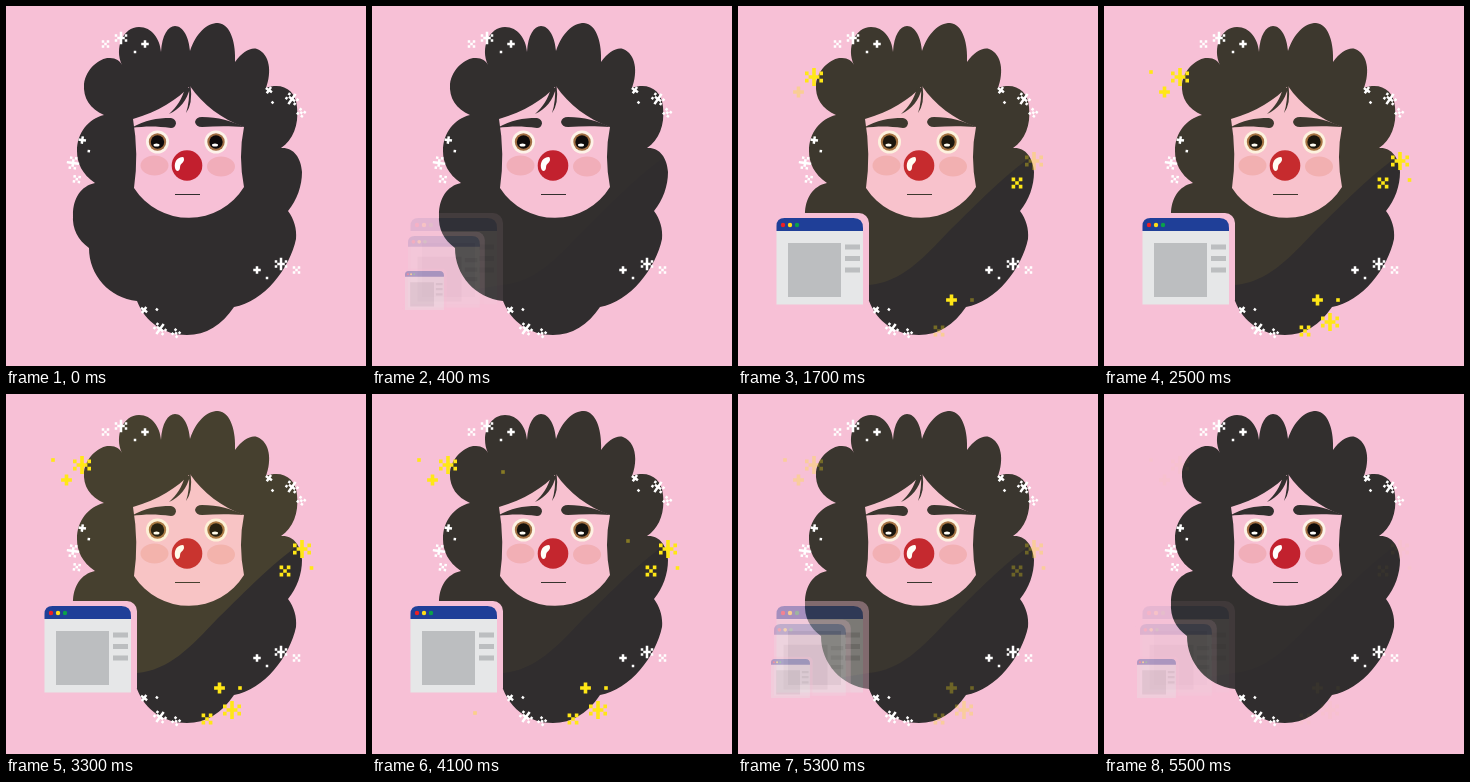
An HTML page that plays this animation: 360x360 px, repeating every 5.7 s.

```html
<!DOCTYPE html>
<html lang="en">
<head>
<meta charset="utf-8">
<title>Curly face and glowing window</title>
<style>
  html, body { margin: 0; width: 100%; height: 100%; overflow: hidden; background: #f7c0d6; }
  svg { display: block; width: 100vw; height: 100vh; }
</style>
</head>
<body>
<svg viewBox="0 0 360 360">
  <defs>
    <path id="hair" d="M98 109C84 103 77 92 78 78C80 62 95 51 104 52C110 52 114 55 116 59
      C108 42 117 21 133 21C146 21 154 33 155 46C156 29 162 20 169 20C177 20 183 31 184 45
      C190 27 201 17 212 17C225 18 230 38 229 56C236 46 245 41 251 43C264 48 266 66 260 82
      C276 76 290 84 291 101C293 119 287 134 275 142C287 141 295 151 296 166C296 180 291 194 282 205
      C288 213 291 223 290 233C284 262 258 296 228 301C216 319 200 329 181 329C158 329 139 316 131 295
      C103 292 83 269 83 242C72 234 66 223 67 209C67 192 75 180 89 177C76 168 71 157 71 145
      C71 127 82 113 98 109Z"/>
    <clipPath id="head"><use href="#hair"/></clipPath>
    <g id="eye">
      <circle r="11.500" fill="#fdf3ea"/>
      <circle r="8.700" fill="#a06d44"/>
      <circle r="6.700" fill="#0d0a0b"/>
      <ellipse cx="-1" cy="3" rx="3" ry="1.500" fill="#fff"/>
    </g>
    <g id="window">
      <rect x="-6" y="-5" width="98.500" height="97" rx="10" fill="#f7c0d6"/>
      <path d="M0 13H86.500V86.500H0Z" fill="#e6e7e8"/>
      <path d="M0 13V8Q0 0 8 0H77Q86.500 0 86.500 10V13Z" fill="#1f3f98"/>
      <circle cx="6.500" cy="7" r="2.200" fill="#ed2024"/>
      <circle cx="13.500" cy="7" r="2.200" fill="#ffde17"/>
      <circle cx="20.500" cy="7" r="2.200" fill="#0ba14a"/>
      <path d="M11.500 25h53v54h-53zM68.500 26.500h15v5h-15zm0 11.500h15v5h-15zm0 11.500h15v5h-15z" fill="#bcbec0"/>
    </g>
  </defs>

  <rect width="360" height="360" fill="#f7c0d6"/>
  <use href="#hair" fill="#302d2e"/>
  <path d="M184 80C172 93 152 106 127 113Q133 148 128 182A65 65 0 0 0 238 181
    Q232 150 238 121C216 113 197 99 184 80Z" fill="#f7c0d6"/>
  <g fill="#302d2e">
    <path d="M179 82C176 93 171 101 163 108C174 103 181 94 184 82ZM183 80Q184 95 180 107Q187 98 184.500 79Z"/>
    <path d="M125 122C140 114 150 112 165 112Q170 113 170 117.500Q169 122 165 122C150 120 140 120 125 122Z"/>
    <path d="M189 116Q190 111 196 111C212 111 226 115 238 121C225 120 210 120 196 121Q190 121 189 116Z"/>
    <path d="M169 188h25v1h-25z"/>
  </g>
  <g fill="#f1adba">
    <ellipse cx="148.500" cy="159.500" rx="14" ry="10"/>
    <ellipse cx="215" cy="160.500" rx="14" ry="10"/>
  </g>
  <use href="#eye" x="151.500" y="136"/>
  <use href="#eye" x="210" y="136"/>
  <circle cx="181" cy="159.500" r="15.300" fill="#c21f2e"/>
  <path d="M177 151C171 151 168 156 169 162C170 166.500 174 165.500 174 161.500C174 157 178 157 178 153.500Q178 151 177 151Z" fill="#fff"/>

  <path id="glow" clip-path="url(#head)" fill="#ffdc3c"
    d="M0 0H360V100L298 147C262 173 243 194 212 224C184 254 163 276 131 279L0 300Z"/>
  <g id="sparks">
    <g id="cluster"></g>
    <use href="#cluster" transform="translate(115 32)"/>
    <use href="#cluster" transform="translate(67 157) rotate(-82)"/>
    <use href="#cluster" transform="translate(154 323) rotate(216)"/>
    <use href="#cluster" transform="translate(275 258) scale(-1 1)"/>
    <use href="#cluster" transform="translate(286 93) rotate(35) scale(-1 1)"/>
  </g>
  <g id="windows"></g>
</svg>

<script>
const LOOP = 5700;
const $ = id => document.getElementById(id);

function add(parent, tag, attrs) {
  const el = document.createElementNS('http://www.w3.org/2000/svg', tag);
  for (const k in attrs) el.setAttribute(k, attrs[k]);
  return parent.appendChild(el);
}

const kinds = {
  star: ['..#..', '#.#.#', '.###.', '#.#.#', '..#..'],
  cross: ['#.#', '.#.', '#.#'],
  plus: ['.#.', '###', '.#.'],
  dot: ['#']
};

function spark(parent, kind, x, y, fill, cell) {
  const rows = kinds[kind], mid = rows.length / 2;
  let d = '';
  rows.forEach((row, j) => [...row].forEach((c, i) => {
    if (c === '#') d += `M${i - mid} ${j - mid}h1v1h-1z`;
  }));
  return add(parent, 'path', { d, fill, transform: `translate(${x} ${y}) scale(${cell})` });
}

// One white cluster, repeated around the hair by rotation and mirroring
const white = (kind, x, y) => spark($('cluster'), kind, x, y, '#fff', 2.5);
white('star', 0, 0);
white('cross', -15.5, 6);
white('plus', 24, 6);
white('dot', 14, 14);
// The defining copy is parked outside the stage
$('sparks').insertBefore(add($('sparks'), 'defs', {}), $('cluster')).append($('cluster'));

const yellow = (kind, x, y) => spark($('sparks'), kind, x, y, '#ffe716', 3.6);
const waves = [
  [yellow('star', 76, 71), yellow('cross', 279, 177), yellow('plus', 213.5, 294)],
  [yellow('plus', 60.5, 86), yellow('star', 296, 155), yellow('cross', 201, 325), yellow('dot', 234, 294)],
  [yellow('dot', 47, 66), yellow('dot', 305.5, 174), yellow('star', 226, 316)]
];
const blinks = [yellow('dot', 131, 78), yellow('dot', 256, 147), yellow('dot', 103, 319)];

// The two smaller windows flash by while the large one builds up
const win = (x, y, s, fade) => ({
  fade, el: add($('windows'), 'use', { href: '#window', transform: `translate(${x} ${y}) scale(${s})` })
});
const windows = [
  win(38.5, 212, 1, p => p ** 2.4),
  win(36, 230, .83, p => 1.5 * p * p * (1 - p)),
  win(33, 265, .45, p => 1.4 * p * (1 - p))
];

const clamp = v => Math.max(0, Math.min(1, v));
const show = (el, opacity) => el.setAttribute('opacity', opacity);

function draw(ms) {
  // Poses hold for 200 ms; one short hold shifts the rhythm at 1100
  const base = ms < 1100 ? 0 : 1100;
  const t = base + Math.floor((ms - base) / 200) * 200;

  const open = Math.min(clamp(t / 1100), clamp((LOOP - t) / 600));
  const pulse = .075 + .04 * Math.cos((t - 5100) * Math.PI / 1000);
  show($('glow'), pulse * open ** 2);
  windows.forEach(w => show(w.el, w.fade(open)));
  waves.forEach((wave, i) => {
    const a = clamp((t - 1100 - 400 * i) / 600) * open ** 3;
    wave.forEach(el => show(el, a));
  });
  blinks.forEach(el => show(el, clamp(1 - Math.abs(t - 4400) / 500)));
}

const begin = performance.now();
function tick() {
  draw((performance.now() - begin) % LOOP);
  requestAnimationFrame(tick);
}
tick();
</script>
</body>
</html>
```
